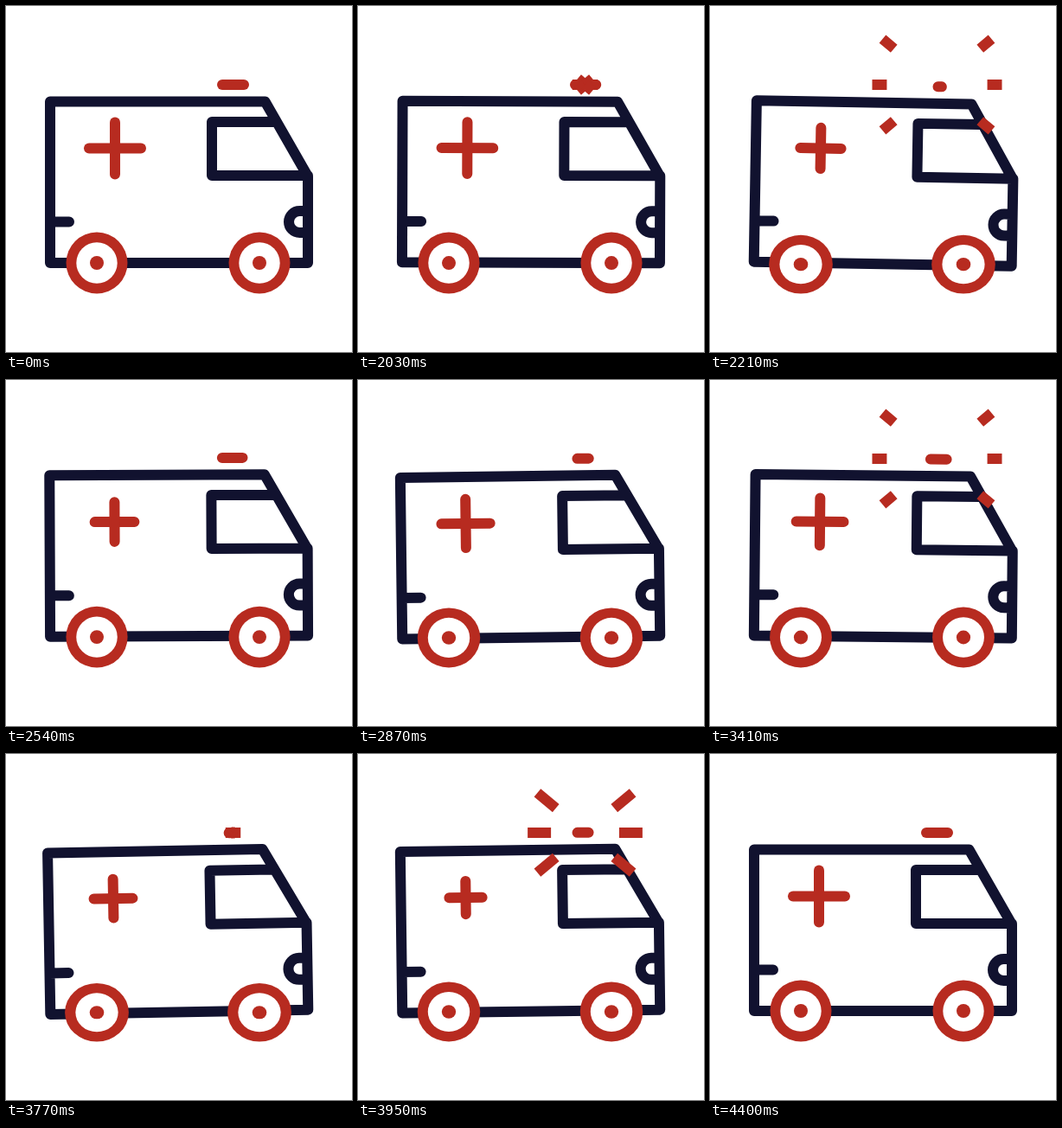
These frames come from a looping animation (400 px wide and 400 px high, 4.43 s). An HTML page with a canvas:

```html
<!DOCTYPE html>
<html lang="en">
<head>
<meta charset="utf-8">
<title>Ambulance</title>
<style>
  html, body { margin: 0; width: 100%; height: 100%; overflow: hidden; background: #fff; }
  canvas { display: block; width: 400px; height: 400px; }
</style>
</head>
<body>
<canvas id="stage" width="400" height="400"></canvas>
<script>
const ctx = document.getElementById('stage').getContext('2d');
const NAVY = '#11122f', RED = '#b72b20';
const LOOP = 4430, REST = 2000, STEP = 30, RATE = 0.9, END = 70;
const FLASHES = [0, 18, 36, 53], FLASH_LENGTH = 8;
const body = new Path2D(
  'M51 297V110.5H299.5L349 197V297Z M311 134H238V196H349 M51 249.5H73' +
  'M347 237H339.5a12.5 12.5 0 0 0 0 25H347');

function line(x1, y1, x2, y2, cap = 'round') {
  ctx.lineCap = cap;
  ctx.beginPath();
  ctx.moveTo(x1, y1);
  ctx.lineTo(x2, y2);
  ctx.stroke();
}

function disc(r, color) {
  ctx.beginPath();
  ctx.arc(0, 0, r, 0, 2 * Math.PI);
  ctx.fillStyle = color;
  ctx.fill();
}

// Four even swings, the last one easing back to rest.
function swing(t) {
  if (t >= END) return 0;
  if (t < 52.5) return Math.sin(Math.PI * t / 15);
  return -(1 + Math.cos(Math.PI * (t - 52.5) / (END - 52.5))) / 2;
}

function drawVan(t, tilt) {
  const fade = Math.max(0, Math.min(1, t / 5, (END - t) / 10));
  ctx.save();
  ctx.translate(200, 280 + fade * (2.8 * Math.abs(tilt) - 1.5));
  ctx.rotate(tilt * Math.PI / 180);
  ctx.translate(-200, -280);
  ctx.strokeStyle = NAVY;
  ctx.lineCap = 'round';
  ctx.stroke(body);

  ctx.strokeStyle = RED;
  const pulse = t < 69 ? Math.sin(Math.PI * t / 23) ** 2 : 0;
  const arm = 30 * (1 - 0.37 * pulse);
  line(126 - arm, 164.5, 126 + arm, 164.5);
  line(126, 164.5 - arm, 126, 164.5 + arm);

  const half = 12.5 * (1 - 0.88 * tilt * tilt);
  line(262.5 - half, 91, 262.5 + half, 91);
  ctx.restore();
}

function drawRays(t) {
  FLASHES.forEach((start, i) => {
    const p = (t - start) / FLASH_LENGTH;
    if (p <= 0 || p >= 1) return;
    const head = p * (0.6 + 0.4 * p);
    const tail = Math.max(0, 2 * p - 1);
    const reach = i % 2 ? 1.04 : 1;
    ctx.strokeStyle = RED;
    for (const side of [-1, 1]) {
      for (const angle of [-40, 0, 40]) {
        const a = angle * Math.PI / 180;
        const first = angle ? 3 : 8, last = (angle ? 113 : 101) * reach;
        const outer = first + (last - first) * head, inner = last * tail;
        if (outer <= inner) continue;
        const dx = side * Math.cos(a), dy = Math.sin(a);
        line(262.5 + dx * inner, 91 + dy * inner, 262.5 + dx * outer, 91 + dy * outer, 'butt');
      }
    }
  });
}

function drawWheel(x, squash) {
  ctx.save();
  ctx.translate(x, 332.5);
  ctx.scale(1 + 0.04 * squash, 1 - 0.05 * squash);
  ctx.translate(0, -35.5);
  disc(35.5, RED);
  disc(23.7, '#fff');
  disc(8, RED);
  ctx.restore();
}

function draw(ms) {
  const t = Math.max(0, Math.floor((ms % LOOP - REST) / STEP)) * RATE;
  const tilt = swing(t);
  ctx.fillStyle = '#fff';
  ctx.fillRect(0, 0, 400, 400);
  ctx.lineWidth = 12;
  ctx.lineJoin = 'round';
  drawVan(t, tilt);
  drawRays(t);
  for (const x of [105, 293]) drawWheel(x, tilt * tilt);
}

const begin = performance.now();
function tick() {
  draw(performance.now() - begin);
  requestAnimationFrame(tick);
}
tick();
</script>
</body>
</html>
```
